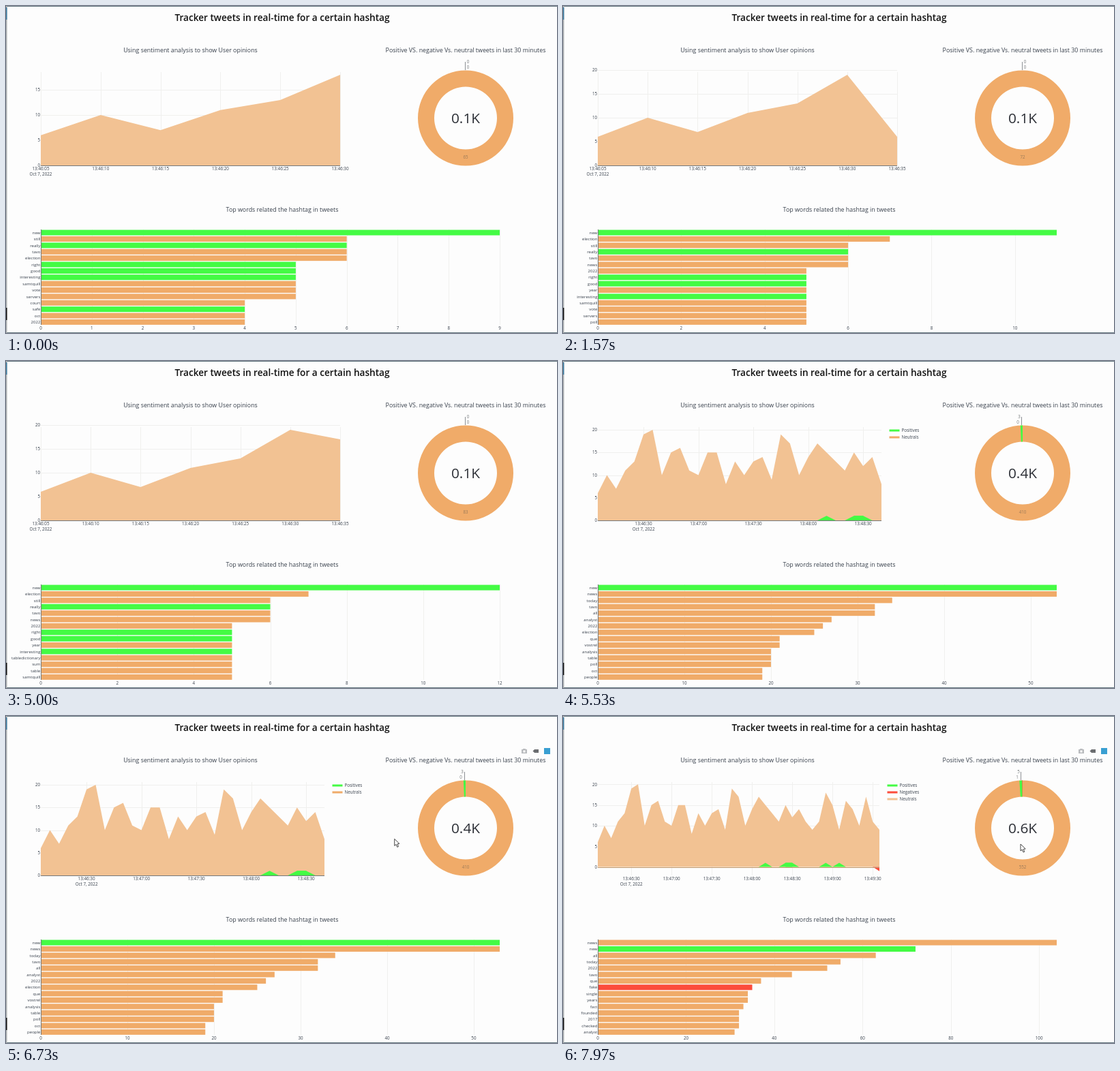
An HTML page with a canvas that plays this animation: 808 by 480 pixels, repeating every 8 s.

```html
<!DOCTYPE html>
<html lang="en">
<head>
<meta charset="utf-8">
<title>Hashtag tracker</title>
<style>
html, body { margin: 0; width: 100%; height: 100%; overflow: hidden; background: #fdfdfd; }
canvas { display: block; }
</style>
</head>
<body>
<canvas id="stage" width="808" height="480"></canvas>
<script>
const LOOP = 8000;
const ctx = document.getElementById('stage').getContext('2d');
const PAPER = '#fdfdfd', INK = '#38404c', GRID = '#f0f0ee', AXIS = '#74787a';
const GREEN = '#44fb44', RED = '#fc4c3c', ORANGE = '#f0ab69', PEACH = '#f2c293', GREY = '#b9bbbe';

const LEFT = 51, BASE = 234, PLOT_H = 140;
const GOOD_WORDS = ['new', 'really', 'right', 'good', 'interesting', 'safe'];
const BAD_WORDS = ['fake'];

// Word counts, each shown from its time on.
const bars = [
  { at: 0, step: 1, words: 'new:9 still:6 really:6 tavo:6 election:6 right:5 good:5 interesting:5 samtquill:5 vote:5 servers:5 court:4 safe:4 oct:4 2022:4' },
  { at: 1430, step: 2, words: 'new:11 election:7 still:6 really:6 tavo:6 news:6 2022:5 right:5 good:5 year:5 interesting:5 samtquill:5 vote:5 servers:5 poll:5' },
  { at: 3400, step: 2, words: 'new:12 election:7 still:6 really:6 tavo:6 news:6 2022:5 right:5 good:5 year:5 interesting:5 tabledictionary:5 sum:5 table:5 samtquill:5' },
  { at: 5030, step: 10, words: 'new:52 news:51 today:33 tavo:32 all:31 analyst:27 2022:26 election:25 que:21 vostrel:21 analysis:20 table:20 poll:20 oct:19 people:19' },
  { at: 5500, step: 10, words: 'new:53 news:53 today:34 tavo:32 all:32 analyst:27 2022:26 election:25 que:21 vostrel:21 analysis:20 table:20 poll:20 oct:19 people:19' },
  { at: 7240, step: 20, words: 'news:104 new:72 all:63 today:55 2022:52 tavo:44 que:37 fake:35 single:34 years:34 fact:33 founded:32 2017:32 checked:32 analyst:31' }
].map(b => ({ ...b, words: b.words.split(' ').map(w => w.split(':')).map(([word, n]) => ({ word, n: +n })) }));

// Neutral tweets per five seconds, beginning at 13:46:05.
const counts = [6, 10, 7, 11, 13, 19, 20, 10, 15, 16, 11, 10, 15, 15, 8, 13, 10, 13, 14, 9, 19, 17,
  10, 14, 17, 15, 13, 11, 15, 12, 14, 11, 9, 11, 18, 15, 9, 16, 14, 10, 17, 11, 9];
const positives = [25, 28, 29, 34, 36];
const upTo = (n, last) => [...counts.slice(0, n - 1), last];
const areas = [
  { at: 0, right: 490, values: upTo(6, 18), tick: 1, total: '0.1K' },
  { at: 1470, right: 490, values: upTo(7, 6), tick: 1, total: '0.1K' },
  { at: 3430, right: 490, values: upTo(7, 17), tick: 1, total: '0.1K' },
  { at: 5030, right: 467, values: upTo(31, 14), tick: 6, total: '0.4K' },
  { at: 5530, right: 467, values: upTo(32, 8), tick: 6, total: '0.4K' },
  { at: 7240, right: 464, values: upTo(43, 9), tick: 6, total: '0.6K', negative: 42 }
];

const current = (list, t) => list.filter(s => s.at <= t).pop();
const ease = (t, from, to) => {
  const p = Math.min(1, Math.max(0, (t - from) / (to - from)));
  return p * p * (3 - 2 * p);
};
const mix = (a, b, p) => a + (b - a) * p;

function text(str, x, y, size, align = 'center', color = INK, weight = 400) {
  ctx.font = `${weight} ${size}px "Open Sans", sans-serif`;
  ctx.textAlign = align;
  ctx.textBaseline = 'alphabetic';
  ctx.fillStyle = color;
  ctx.fillText(str, x, y + size * 0.36);
}
function rect(x, y, w, h, color) {
  ctx.fillStyle = color;
  ctx.fillRect(x, y, w, h);
}
function polygon(points, fill, stroke) {
  ctx.beginPath();
  points.forEach(([x, y]) => ctx.lineTo(x, y));
  ctx.closePath();
  if (fill) { ctx.fillStyle = fill; ctx.fill(); }
  if (stroke) { ctx.strokeStyle = stroke; ctx.lineWidth = 1; ctx.stroke(); }
}
const vline = (x, y0, y1, color) => rect(Math.round(x), y0, 1, y1 - y0, color);
const hline = (x0, x1, y, color) => rect(x0, Math.round(y), x1 - x0, 1, color);

function clock(seconds) {
  const s = 13 * 3600 + 46 * 60 + 5 + seconds;
  return [s / 3600, s / 60 % 60, s % 60].map(v => String(Math.floor(v)).padStart(2, '0')).join(':');
}

function drawFrame() {
  rect(0, 0, 808, 480, PAPER);
  rect(0, 0, 808, 1, '#62767e');
  rect(0, 479, 808, 1, '#62767e');
  rect(0, 0, 1.5, 480, '#a8acae');
  rect(0, 2, 1.5, 18, '#3d7ea4');
  rect(0, 443, 1.5, 18, '#111');
  text('Tracker tweets in real-time for a certain hashtag', 405, 17.5, 13.62, 'center', '#111', 600);
  text('Using sentiment analysis to show User opinions', 270.5, 64.5, 8.87);
  text('Positive VS. negative Vs. neutral tweets in last 30 minutes', 674, 64.5, 8.87);
  text('Top words related the hashtag in tweets', 405, 298.5, 8.87);
}

function areaScale(a) {
  const max = Math.max(...a.values);
  const unit = PLOT_H / (a.negative ? (max + 1) * 1.1 : max / 0.95);
  const zero = a.negative ? BASE - unit * (1 + (max + 1) * 0.05) : BASE;
  const dx = (a.right - LEFT) / (a.values.length - 1);
  return { x: i => LEFT + i * dx, y: v => zero - v * unit, dx, top: BASE - PLOT_H };
}

function drawArea(a) {
  const { x, y, top } = areaScale(a);
  const last = a.values.length - 1;
  const first = a.tick > 1 ? 5 : 0;
  for (let i = first; i <= last; i += a.tick) {
    vline(x(i), top + 3, BASE, GRID);
    text(clock(i * 5), x(i), 239, 6.3);
  }
  text('Oct 7, 2022', x(first), 247, 6.3);
  for (let v = 0; v <= 20 && y(v) >= top - 0.5; v += 5) {
    hline(LEFT, a.right, y(v), GRID);
    text(v, 50, y(v), 6.2, 'right');
  }
  const shape = (from, to, value, color) => {
    const points = [[x(from), y(0)]];
    for (let i = from; i <= to; i++) points.push([x(i), y(value(i))]);
    polygon([...points, [x(to), y(0)]], color);
  };
  shape(0, last, i => a.values[i], PEACH);
  const seen = positives.filter(i => i <= last);
  seen.forEach(i => shape(i - 1, i + 1, j => positives.includes(j) ? 1 : 0, GREEN));
  if (a.negative) shape(a.negative - 1, a.negative, i => i === a.negative ? -1 : 0, RED);
  hline(LEFT, a.right, y(0), a.negative ? '#c09a70' : AXIS);

  if (seen.length) {
    const entries = a.negative
      ? [['Positives', GREEN], ['Negatives', RED], ['Neutrals', PEACH]]
      : [['Positives', GREEN], ['Neutrals', ORANGE]];
    const lx = a.right + 11.5;
    entries.forEach(([name, color], i) => {
      rect(lx, 100.5 + i * 10, 15, 3, color);
      text(name, lx + 18, 102 + i * 10, 6.3, 'left');
    });
  }
}

function drawDonut(a) {
  const cx = 674, cy = 164.5, top = -Math.PI / 2;
  const good = positives.filter(i => i < a.values.length).length;
  const bad = a.negative ? 1 : 0;
  const neutral = a.values.reduce((s, v) => s + v, 0);
  const arc = (from, to, color) => {
    ctx.beginPath();
    ctx.arc(cx, cy, 70, from, to);
    ctx.arc(cx, cy, 46, to, from, true);
    ctx.fillStyle = color;
    ctx.fill();
  };
  arc(0, Math.PI * 2, ORANGE);
  const turn = Math.PI * 2 / (good + bad + neutral);
  if (bad) arc(top - turn, top, RED);
  if (good) arc(top - turn * (good + bad), top - turn * bad, GREEN);
  const lx = good ? (bad ? 671 : 672) : 673;
  vline(lx, 82, 94, '#8c9094');
  text(good, good ? lx - 3 : 677.5, 82, 6.2, 'center', '#74787a');
  text(bad, good ? lx - 5 : 677.5, 90, 6.2, 'center', '#74787a');
  text(neutral, cx, 222, 6.2, 'center', '#9a7a58');
  text(a.total, cx, 165, 20.8, 'center', '#2c2f36');
}

function drawBars({ words, step }) {
  const unit = 673 / Math.max(...words.map(w => w.n));
  for (let v = 0; v * unit <= 673.5; v += step) {
    vline(LEFT + v * unit, 328, 468, GRID);
    text(v, LEFT + v * unit, 473, 6.2);
  }
  words.forEach(({ word, n }, i) => {
    const y = 332.6 + i * 9.38;
    const color = GOOD_WORDS.includes(word) ? GREEN : BAD_WORDS.includes(word) ? RED : ORANGE;
    rect(LEFT, y - 4, n * unit, 8, color);
    text(word, 50.5, y, 6.1, 'right');
  });
  vline(LEFT, 328, 468, AXIS);
}

function camera(x) {
  rect(x - 4, 49, 8, 6, GREY);
  rect(x - 2, 48, 4, 1, GREY);
  rect(x - 1.5, 50.5, 3, 3, PAPER);
}
function tag(x, color) {
  polygon([[x - 4.5, 51.5], [x - 2, 49], [x + 4, 49], [x + 4, 54], [x - 2, 54]], color);
}
const badge = x => rect(x - 4.5, 47, 9, 9, '#3a9fd2');

function drawRightTools() {
  camera(760);
  tag(777, '#6b6d70');
  badge(793.5);
}
function drawLeftTools() {
  camera(383);
  ctx.strokeStyle = '#55575a';
  ctx.lineWidth = 1.5;
  ctx.beginPath();
  ctx.arc(399, 50.5, 2.7, 0, 7);
  ctx.moveTo(401, 52.5);
  ctx.lineTo(404, 55.5);
  ctx.stroke();
  rect(408, 51, 8, 1, GREY);
  rect(411.5, 47.5, 1, 8, GREY);
  [429, 441].forEach((x, i) => {
    rect(x - 4, 48, 8, 7, GREY);
    rect(x - 2, 51, 4, 1, PAPER);
    if (!i) rect(x - 0.5, 49.5, 1, 4, PAPER);
  });
  ctx.strokeStyle = GREY;
  ctx.lineWidth = 1;
  ctx.beginPath();
  ctx.moveTo(450, 48); ctx.lineTo(457, 55);
  ctx.moveTo(457, 48); ctx.lineTo(450, 55);
  ctx.moveTo(464, 55); ctx.lineTo(464, 48); ctx.lineTo(468, 53); ctx.lineTo(468, 48);
  ctx.moveTo(479, 48.5); ctx.lineTo(484.5, 48.5); ctx.lineTo(484.5, 55);
  ctx.stroke();
  tag(496, GREY);
  rect(504, 49, 8, 2, '#55575a');
  rect(504, 52, 8, 2, '#55575a');
  badge(524.5);
}

function hoverLabel(x, y, value, name, color, textColor) {
  polygon([[x, y], [x + 3, y - 3], [x + 3, y - 6], [x + 14, y - 6], [x + 14, y + 6], [x + 3, y + 6], [x + 3, y + 3]], color, '#5c5044');
  text(value, x + 8.5, y, 6.3, 'center', '#3c3428');
  text(name, x + 16, y, 6.3, 'left', textColor);
}
function drawHover(a, cx) {
  const { x, y, dx } = areaScale(a);
  const i = Math.max(0, Math.min(a.values.length - 1, Math.round((cx - LEFT) / dx)));
  const px = x(i);
  hoverLabel(px, y(a.values[i]), a.values[i], 'Neutrals', '#e8963c', '#dc9858');
  if (positives.includes(i)) {
    rect(px + 12, 222, a.right - px - 12, 11.5, PAPER);
    hoverLabel(px, y(1), 1, 'Positives', GREEN, '#48d848');
  }
  rect(px - 34, 237.5, 70, 11, '#36363a');
  polygon([[px - 3, 238], [px, 234.5], [px + 3, 238]], '#36363a');
  text('Oct 7, 2022, ' + clock(i * 5), px + 1, 243, 6.3, 'center', '#fff', 600);
}

function drawPointer(x, y) {
  const outline = [[0, 0], [0, 10], [2.4, 8], [4, 12], [5.8, 11.2], [4.2, 7.4], [7.2, 7]];
  polygon(outline.map(([dx, dy]) => [x + dx, y + dy]), '#fff', '#444');
}
function drawCross(x, y) {
  rect(x - 6, y - 1, 12, 2, '#5c4a68');
  rect(x - 1, y - 8, 2, 16, '#5c4a68');
}

function pointerAt(t) {
  if (t >= 6270 && t < 7240) {
    const p = ease(t, 6270, 7180);
    return { x: mix(713, 432, p), y: mix(132, 227, p) };
  }
  if (t >= 7530) {
    const p = ease(t, 7640, 7970);
    return { x: mix(781, 671, p), y: mix(244, 188, p) };
  }
  return null;
}

function draw(t) {
  const area = current(areas, t);
  const pointer = pointerAt(t);
  drawFrame();
  drawArea(area);
  drawDonut(area);
  drawBars(current(bars, t));
  if (!pointer) return;
  const { x, y } = pointer;
  if (x < 540) drawLeftTools();
  else if (t < 7530 || t >= 7670) drawRightTools();
  if (x <= area.right + 4) {
    drawHover(area, x);
    drawCross(x, y);
  } else {
    drawPointer(x, y);
  }
}

const start = performance.now();
function tick() {
  draw((performance.now() - start) % LOOP);
  requestAnimationFrame(tick);
}
tick();
</script>
</body>
</html>
```
